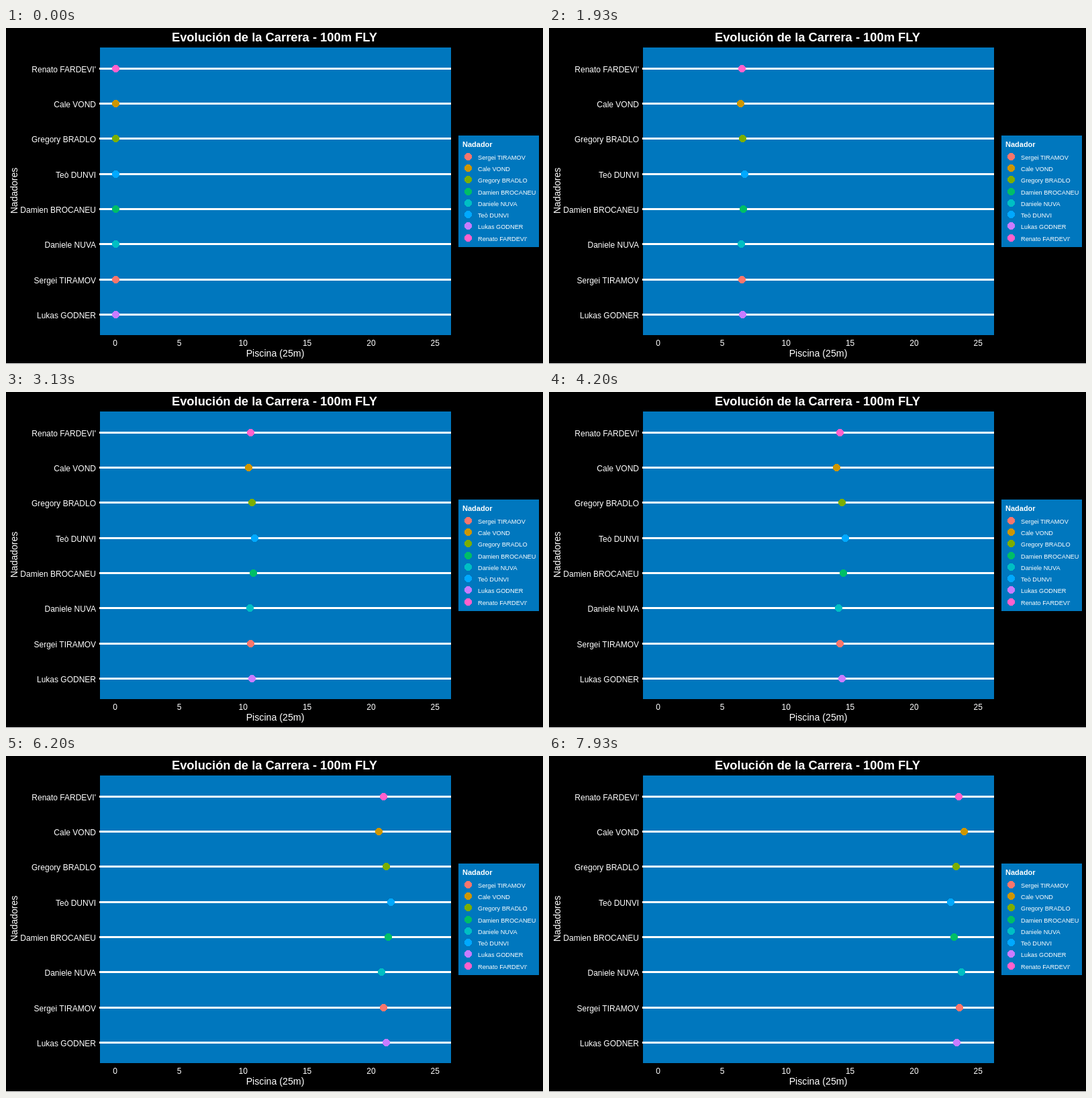
An HTML page for the animation above (8 s loop, 800 px wide and 500 px high).

```html
<!DOCTYPE html>
<html lang="es">
<head>
<meta charset="utf-8">
<title>Evolución de la Carrera</title>
<style>
  html, body { margin: 0; width: 100%; height: 100%; overflow: hidden; background: #000; }
  svg { display: block; width: 100%; height: 100%; }
  text { font-family: "Liberation Sans", Arial, sans-serif; fill: #fff; }
  rect, circle { shape-rendering: crispEdges; }
</style>
</head>
<body>
<svg id="chart" viewBox="0 0 800 500"></svg>
<script>
const LOOP = 8000, STEPS = 120;
const START = 163.05, WALL = 639.5;
const WATER = '#0077be';

// Lanes from top to bottom: speeds are pixels per step, out and back.
const swimmers = [
  { name: "Renato FARDEVI'", color: '#ff61cc', key: 7, out: 4.293, back: 3.62 },
  { name: 'Cale VOND',       color: '#cd9600', key: 1, out: 4.221, back: 3.41 },
  { name: 'Gregory BRADLO',  color: '#7cae00', key: 2, out: 4.335, back: 3.63 },
  { name: 'Teò DUNVI',       color: '#00a9ff', key: 5, out: 4.416, back: 3.69 },
  { name: 'Damien BROCANEU', color: '#00be67', key: 3, out: 4.367, back: 3.64 },
  { name: 'Daniele NUVA',    color: '#00bfc4', key: 4, out: 4.2585, back: 3.51 },
  { name: 'Sergei TIRAMOV',  color: '#f8766d', key: 0, out: 4.293, back: 3.49 },
  { name: 'Lukas GODNER',    color: '#c77cff', key: 6, out: 4.335, back: 3.52 }
];

const chart = document.getElementById('chart');

function add(tag, attrs, content = '') {
  const node = document.createElementNS(chart.namespaceURI, tag);
  for (const [key, value] of Object.entries(attrs)) node.setAttribute(key, value);
  node.textContent = content;
  return chart.appendChild(node);
}
const box = (x, y, width, height, fill) => add('rect', { x, y, width, height, fill });
const dot = (cx, cy, fill) => add('circle', { cx, cy, r: 5.5, fill });
const label = (content, x, y, size, anchor = 'start', more = {}) =>
  add('text', { x, y, 'font-size': size, 'text-anchor': anchor, ...more }, content);

const bold = { 'font-weight': 'bold' };
label('Evolución de la Carrera - 100m FLY', 400, 20, 18.35, 'middle', bold);
label('Piscina (25m)', 401, 489, 14.2, 'middle');
label('Nadadores', 0, 0, 14, 'middle', { transform: 'translate(17 242) rotate(-90)' });
box(140, 29, 523, 428, WATER);
box(0, 499, 800, 1, '#fff');
for (let i = 0; i <= 5; i++) label(i * 5, 162.7 + 95.3 * i, 473, 12, 'middle');

box(674, 160, 120, 166, WATER);
label('Nadador', 680, 177, 11, 'start', bold);

swimmers.forEach((s, lane) => {
  const y = Math.floor(60.3 + 52.29 * lane);
  box(139, y - 1, 524, 3, '#fff');
  label(s.name, 134, y + 6, 12, 'end');
  s.dot = dot(START, y + 0.5, s.color);

  const keyY = Math.floor(191.2 + 17.29 * s.key);
  dot(688.5, keyY + 0.5, s.color);
  label(s.name, 703, keyY + 4.5, 9.2);
});

function position(s, step) {
  const turn = (WALL - START) / s.out;
  return step < turn ? START + s.out * step : WALL - s.back * (step - turn);
}

function draw(now) {
  // Steps start on multiples of 10 ms, hence the half-unit offset.
  const step = Math.floor((now % LOOP + 5) * STEPS / LOOP) % STEPS;
  for (const s of swimmers) s.dot.setAttribute('cx', Math.floor(position(s, step)) + 0.5);
}

const begin = performance.now();
function tick() {
  draw(performance.now() - begin);
  requestAnimationFrame(tick);
}
tick();
</script>
</body>
</html>
```
